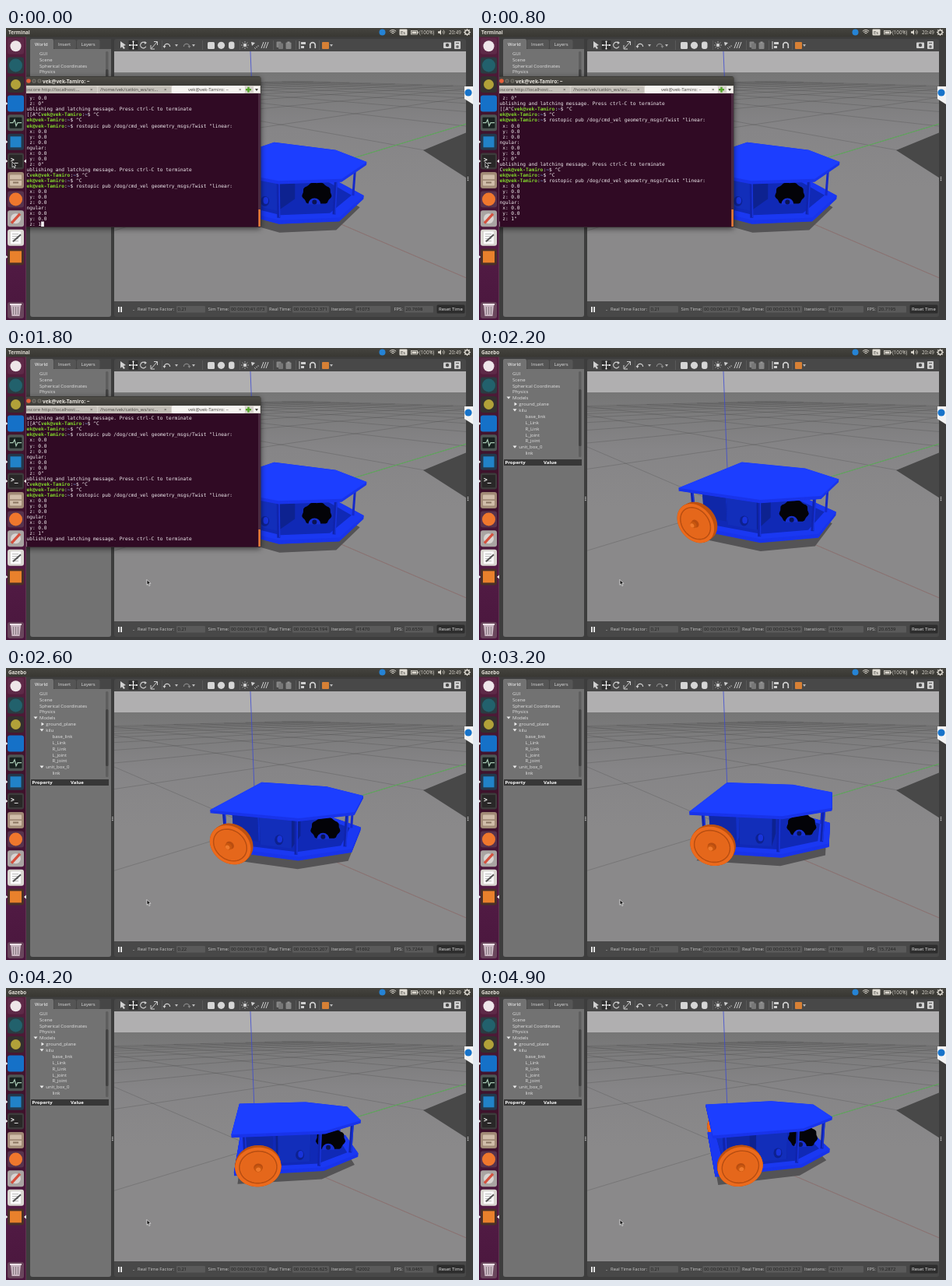
Animation of 600x375 px, one loop 5 s. Source, as an HTML page with a canvas:

```html
<!DOCTYPE html>
<html lang="en">
<head>
<meta charset="utf-8">
<title>Robot simulation</title>
<style>
html, body { margin: 0; width: 100%; height: 100%; overflow: hidden; background: #444; }
canvas { display: block; width: 600px; height: 375px; }
</style>
</head>
<body>
<canvas id="stage" width="600" height="375"></canvas>
<script>
const g = document.getElementById('stage').getContext('2d');
const SANS = '"Open Sans", "Noto Sans", sans-serif';
const MONO = '"DejaVu Sans Mono", "Liberation Mono", monospace';
const CHAR = 3.735, LOOP = 5000;

// ---- helpers ----
function rect(x, y, w, h, c) { g.fillStyle = c; g.fillRect(x, y, w, h); }
function box(x, y, w, h, r, c) { g.fillStyle = c; g.beginPath(); g.roundRect(x, y, w, h, r); g.fill(); }
function disc(x, y, r, c, ry = r) { g.fillStyle = c; g.beginPath(); g.ellipse(x, y, r, ry, 0, 0, 7); g.fill(); }
function trace(pts) { g.beginPath(); pts.forEach(p => g.lineTo(p[0], p[1])); }
function poly(pts, c) { trace(pts); g.closePath(); g.fillStyle = c; g.fill(); }
function line(pts, c, w = 1) { trace(pts); g.strokeStyle = c; g.lineWidth = w; g.stroke(); }
function ring(x, y, r, c, w = 1, a = 0, b = 7) {
  g.beginPath(); g.arc(x, y, r, a, b); g.strokeStyle = c; g.lineWidth = w; g.stroke();
}
function text(s, x, y, c = '#ddd', size = 6, weight = '', family = SANS) {
  g.font = `${weight} ${size}px ${family}`; g.fillStyle = c; g.fillText(s, x, y);
}
function fade(y0, y1, ...stops) {
  const f = g.createLinearGradient(0, y0, 0, y1);
  stops.forEach((c, i) => f.addColorStop(i / (stops.length - 1), c));
  return f;
}
function mix(x, knots) {
  let i = 1;
  while (i < knots.length - 1 && x > knots[i][0]) i++;
  const [a, b] = [knots[i - 1], knots[i]];
  const k = Math.min(1, Math.max(0, (x - a[0]) / (b[0] - a[0])));
  return a[1] + (b[1] - a[1]) * k;
}
const step = (t, list) => list.filter(e => e[0] <= t).pop()[1];

// ---- scene: u is the drop below the camera, 1 at the upper plate ----
const HORIZON = 57, VIEW_W = 452;
function project(X, Z, u) {
  const d = Z + .34 * (u - 1);
  return [366 + 416 * X / d, HORIZON + 416 * u / d];
}
function ground(a, b) {
  return [-.304 + a * .684 + b * .729, 2.81 - a * .729 + b * .684];
}
function groundLine(a0, b0, a1, b1, c, w) {
  let [p, q] = [ground(a0, b0), ground(a1, b1)];
  if (p[1] > q[1]) [p, q] = [q, p];
  const near = .6;
  if (q[1] < near) return;
  if (p[1] < near) {
    const k = (near - p[1]) / (q[1] - p[1]);
    p = [p[0] + (q[0] - p[0]) * k, near];
  }
  line([p, q].map(([X, Z]) => [366 + 416 * X / Z, HORIZON + 416 / Z]), c, w);
}

function world() {
  rect(139, 30, VIEW_W, 28, '#b0afb0');
  rect(139, HORIZON, VIEW_W, 294, fade(57, 351, '#767676', '#868587', '#8a898a', '#8a898a', '#8a898a'));
  const cell = 2.4, end = 24;
  for (let i = -10; i <= 10; i++) {
    const c = 'rgba(60,60,60,.42)';
    groundLine(i * cell, -end, i * cell, end, c, .6);
    groundLine(-end, i * cell, end, i * cell, c, .6);
  }
  groundLine(0, 0, 6, 0, '#9c6f6d', .6);
  groundLine(0, 0, 0, end, '#5cb058', 1);
  line([[314, 30], [321, 205]], '#3c49d2', .8);
  poly([[536, 157], [592, 134], [592, 193]], '#484848');
}

const PLATE = [[-.3, .735], [.64, .735], [1.15, .38], [1.11, -.3], [.62, -.64], [-.32, -.65]];
const POSTS = [[-.2, .6], [.58, .6], [1.04, .32], [1.03, -.24], [.58, -.58], [-.2, -.58]];
const DECK = 1.43;

function robot(deg) {
  const c = Math.cos(deg * Math.PI / 180), s = Math.sin(deg * Math.PI / 180);
  const at = (p, q, u) => project(-.34 + p * c - q * s, 3.85 + p * s + q * c, u);
  const outline = (u, k = 1) => PLATE.map(([p, q]) => at(.35 + (p - .35) * k, q * k, u));
  const slab = (u, thick, top, edge) => {
    for (let d = thick; d > 0; d -= .004) poly(outline(u + d), edge);
    poly(outline(u), top);
  };
  const circle = (q, r) => Array.from({ length: 48 }, (_, i) => {
    const a = i * Math.PI / 24;
    return at(-.07 + r * Math.cos(a), q, 1.345 + r * Math.sin(a));
  });
  const wheel = (from, to) => {
    for (let i = 0; i <= 8; i++) poly(circle(from + (to - from) * i / 8, .228), '#bd5010');
    poly(circle(to, .228), '#ec6a1c');
  };
  const block = (p0, p1, q0, q1, u0, u1, face, side) => {
    for (const p of [p1, p0]) poly([at(p, q0, u0), at(p, q1, u0), at(p, q1, u1), at(p, q0, u1)], side);
    poly([at(p0, q0, u0), at(p1, q0, u0), at(p1, q0, u1), at(p0, q0, u1)], face);
  };

  poly(outline(1.59, .96), '#545355');
  wheel(.68, .74);
  slab(DECK, .045, '#1a38f2', '#1934ea');
  poly(outline(DECK, .84), '#1029b6');
  POSTS.slice(0, 3).forEach(([p, q]) => line([at(p, q, 1.02), at(p, q, DECK)], '#1529c9', 3));
  block(-.2, .1, -.4, .45, 1.08, DECK, '#0f27a8', '#1230c8');
  block(.15, .5, -.47, -.1, 1.08, DECK, '#122eba', '#0d2290');
  const [kx, ky] = at(.38, -.52, 1.32);
  disc(kx, ky, 5.5, '#0d2190', 6.5);
  disc(kx + 1, ky - 1, 3.3, '#1833da', 4.5);

  const [bx, by] = at(.8, -.17, 1.28);
  poly(Array.from({ length: 40 }, (_, i) => {
    const a = i * Math.PI / 20, r = 1 + .045 * Math.sin(9 * a);
    return [bx + 18.5 * r * Math.cos(a), by + Math.min(12, 15 * r * Math.sin(a))];
  }), '#030308');
  g.beginPath(); g.arc(bx - 3, by + 13, 8, Math.PI, 0); g.fillStyle = '#1730d0'; g.fill();
  disc(bx - 3, by + 10, 3, '#0b1454');
  POSTS.slice(3).forEach(([p, q]) => {
    line([at(p, q, 1.02), at(p, q, DECK + .01)], '#1024ac', 4);
    line([at(p + .012, q, 1.02), at(p + .012, q, DECK)], '#1834dc', 1.5);
  });
  slab(1, .034, '#1c3eff', '#1934ea');

  wheel(-.68, -.74);
  const rim = circle(-.74, .185);
  line([...rim, rim[0]], '#b94f12', 1.6);
  poly(circle(-.74, .17), '#e5671b');
  poly(circle(-.74, .045), '#b94d10');
  poly(circle(-.77, .038), '#c9570f');
  poly(circle(-.79, .024), '#f07a2c');
}

// ---- simulator window ----
function tree() {
  rect(26, 11, 574, 364, '#3d3d3d');
  box(31, 20, 104, 351, 3, '#727272');
  rect(61, 14, 74, 13, '#464646');
  box(31, 14, 30, 14, 2, '#727272');
  box(61.5, 15, 28.5, 12, 2, '#555');
  box(91, 15, 29.5, 12, 2, '#555');
  text('World', 37, 23, '#fff'); text('Insert', 67, 23); text('Layers', 96.5, 23);
  const rows = ['GUI', 'Scene', 'Spherical Coordinates', 'Physics', 'Models', ' ground_plane', ' kilu',
    '  base_link', '  L_Link', '  R_Link', '  L_joint', '  R_joint', ' unit_box_0', '  link'];
  rows.forEach((row, i) => {
    const name = row.trim(), depth = row.length - name.length, y = 34.8 + i * 7.88;
    text(name, 43 + depth * 8.3, y, '#e2e2e2');
    if (i === 5) poly([[45.5, y - 4.5], [49, y - 2.2], [45.5, y]], '#eee');
    if (i === 4 || i === 6 || i === 12) {
      const x = depth ? 43.5 : 35.5;
      poly([[x, y - 3.8], [x + 5, y - 3.8], [x + 2.5, y - .7]], '#eee');
    }
  });
  box(128, 30, 3.5, 110, 1.5, '#5e5e5e');
  box(128, 53, 3.5, 73, 1.5, '#424242');
  rect(32, 143, 100, 8, '#373737');
  text('Property', 33.5, 149.2, '#fff', 6, 'bold');
  text('Value', 83, 149.2, '#fff', 6, 'bold');
  for (let i = 0; i < 3; i++) rect(136.2, 191 + i * 2, 1.4, 1.2, '#ccc');
}

function toolbar() {
  box(139, 14, VIEW_W, 357, 3, '#484848');
  const ink = '#d0d0d0', dim = '#868686';
  poly([[147, 17], [154, 22], [151, 23], [153, 26], [151, 27], [149, 24], [147, 26]], ink);
  box(157.5, 16, 12, 12, 1, '#303030');
  line([[159, 22], [168, 22]], '#fff'); line([[163.5, 17.5], [163.5, 26.5]], '#fff');
  [[159, 22], [168, 22], [163.5, 17.5], [163.5, 26.5]].forEach(([x, y]) => disc(x, y, 1.1, '#fff'));
  ring(176.5, 22, 3.8, ink, 1.2, .5, 5.6);
  poly([[178, 17], [181, 19], [178, 21]], ink);
  line([[187, 26], [194, 18]], ink);
  line([[186, 22], [186, 27], [191, 27]], ink); line([[190, 17.5], [194.5, 17.5], [194.5, 22]], ink);
  for (const [x, d, c] of [[207, 1, ink], [232, -1, dim]]) {
    ring(x, 24, 3.6, c, 1.2, Math.PI, 6.3);
    poly([[x - 5.5 * d, 23], [x - 1.5 * d, 23], [x - 3.5 * d, 26]], c);
  }
  [219, 241, 418].forEach(x => poly([[x - 2, 21], [x + 2, 21], [x, 24]], '#bbb'));
  box(259, 18, 9, 9, 1.5, '#d6d6d6'); disc(276.5, 22.3, 4.6, '#d6d6d6'); box(286, 17.5, 7.5, 9.5, 3, '#d6d6d6');
  disc(307, 22, 2.2, ink);
  for (let i = 0; i < 8; i++) {
    const a = i * Math.PI / 4, x = Math.cos(a), y = Math.sin(a);
    line([[307 + 3.2 * x, 22 + 3.2 * y], [307 + 4.8 * x, 22 + 4.8 * y]], ink, .8);
  }
  poly([[315, 18], [320, 19], [316, 23]], ink);
  for (let i = 0; i < 3; i++) {
    line([[319 + i * 2, 25 - i], [321 + i * 2, 27 - i * 2]], ink, .7);
    line([[328 + i * 3, 26], [331 + i * 3, 18]], ink, 1);
  }
  box(347.5, 17.5, 6, 7.5, 1, dim); box(350, 19.5, 6, 7.5, 1, '#777');
  box(359.5, 18.5, 7, 8.5, 1, dim); rect(361.5, 17.5, 3, 2, '#999');
  line([[377, 17], [377, 27]], ink); rect(379, 18, 6, 3, ink); rect(379, 23, 4, 3, ink);
  ring(394, 22, 3.3, ink, 1.7, Math.PI, 6.3);
  rect(390, 22, 1.6, 4, ink); rect(396.5, 22, 1.6, 4, ink);
  box(406, 18, 9, 9, 1, '#d78035');
  [200, 252, 300, 343, 372, 402].forEach(x => rect(x, 16, .7, 12, '#626262'));
  box(562, 18.5, 10, 7.5, 1, ink); disc(567, 22, 2.2, '#4b4b4b');
  box(576, 17, 8, 10, 1, ink); rect(578, 19, 4, 1, '#555'); disc(580, 24, 1.8, '#666');
}

const TICKS = [[0, 0], [800, 4], [1800, 9], [2600, 14], [3200, 16], [4200, 21], [4900, 24]];
const SIM = [[0, 41073], [4, 41270], [9, 41470], [14, 41692], [16, 41780], [21, 42002], [24, 42117]];
const FPS = [[0, '20.7698'], [500, '20.7195'], [1500, '20.6539'], [2400, '15.7244'], [3500, '18.0465'], [4500, '19.2872']];

function statusBar(t) {
  rect(144, 358, 1.8, 7, '#eee'); rect(147.2, 358, 1.8, 7, '#eee');
  rect(163.5, 362, 1, 1, '#aaa');
  const n = Math.floor(mix(t, TICKS) + 1e-6), sim = Math.round(mix(n, SIM));
  const factor = t >= 2400 && t < 3100 ? '0.22' : '0.21';
  const fields = [
    ['Real Time Factor:', 169, 219, 37, factor],
    ['Sim Time:', 259.5, 287.5, 48, '00 00:00:' + (sim / 1000).toFixed(3)],
    ['Real Time:', 338, 368, 47, '00 00:02:' + (52.371 + n * .20255).toFixed(3)],
    ['Iterations:', 418, 449, 45, sim],
    ['FPS:', 498.5, 512, 37, step(t, FPS)]
  ];
  for (const [label, x, fx, w, value] of fields) {
    text(label, x, 363.3, '#c8c8c8', 5.9);
    box(fx, 357, w, 8.5, 1, '#5a5a5a');
    text(value, fx + 1.5, 363.3, '#1c1c1c', 5.9);
  }
  box(553.5, 355.5, 36, 11, 1.5, '#2d2d2d');
  text('Reset Time', 556, 363.3, '#e8e8e8', 6);
}

function rightEdge() {
  for (let i = 0; i < 3; i++) rect(592.8, 191 + i * 2, 1.4, 1.2, '#ccc');
  poly([[589, 75], [600, 75], [600, 98], [589, 91]], '#f3f3f3');
  disc(594, 83, 4.6, '#1773ca');
}

// ---- terminal ----
const USER = 'vek@vek-Tamiro';
const PUB = '$rostopic pub /dog/cmd_vel geometry_msgs/Twist "linear:';
const LATCH = 'publishing and latching message. Press ctrl-C to terminate';
const TWIST = ['  x: 0.0', '  y: 0.0', '  z: 0.0', 'angular:', '  x: 0.0', '  y: 0.0'];
const HISTORY = [...TWIST.slice(5), '  z: 0"', LATCH, '^[[A^C$^C', '$^C', PUB,
  ...TWIST, '  z: 0"', LATCH, '^C$^C', '$^C', PUB, ...TWIST];

function row(s, y) {
  const put = (str, col, c = '#f2eef1', w = '') => text(str, 22.7 + col * CHAR, y, c, 6.2, w, MONO);
  const i = s.indexOf('$');
  if (i < 0) return put(s, 0);
  const k = i + USER.length;
  put(s.slice(0, i), 0);
  put(USER, i, '#82d72c', 'bold');
  put(':', k); put('~', k + 1, '#7195cf', 'bold'); put('$', k + 2);
  put(s.slice(i + 1), k + 4);
}

function terminal(t) {
  g.save();
  g.shadowColor = 'rgba(0,0,0,.55)'; g.shadowBlur = 7; g.shadowOffsetY = 2;
  box(20, 62, 307.5, 194, 3, '#3b3a36');
  g.restore();
  rect(20, 63, 307, 11, fade(62, 74, '#504e48', '#3c3b37'));
  disc(29, 68, 2.8, '#e6603b');
  [36, 43].forEach(x => { disc(x, 68, 2.6, '#77756d'); disc(x, 68, 1.5, '#55534d'); });
  text(USER + ': ~', 47, 70.5, '#e9e6df', 6.5, 'bold');
  rect(20, 74, 307, 10, '#d6d2cb');
  box(20, 75, 97, 9, 2, '#c4c0b9'); box(118, 75, 94, 9, 2, '#c4c0b9'); box(213, 74, 94, 10, 2, '#f5f3f0');
  const ink = '#45433f';
  text('roscore http://localhost:…', 23, 81.3, ink, 6);
  text('/home/vek/catkin_ws/src…', 121, 81.3, ink, 6);
  text(USER + ': ~', 234, 81.3, ink, 6);
  [110, 205, 301].forEach(x => text('×', x - 2, 81.3, ink, 6));
  rect(308, 78, 7, 2.4, '#55a52c'); rect(310.3, 75.7, 2.4, 7, '#55a52c');
  box(318, 75, 8, 8, 1, '#f5f3f0'); poly([[320, 78], [324, 78], [322, 81]], ink);
  rect(20, 84, 307, 171.5, '#300a24');
  rect(324, 84, 3, 171, '#4a2a40');
  rect(324.4, 233, 2.4, 22, '#ee7d35');

  const rows = [...HISTORY, t < 300 ? '  z: 1' : '  z: 1"'];
  if (t >= 1300) rows.push(LATCH);
  if (t >= 500) rows.push('');
  const last = rows.slice(-24);
  last.forEach((s, i) => row(s, 92.3 + i * 7.04));
  rect(22.7 + last[23].length * CHAR, 248.5, CHAR, 6.6, '#f2eef1');
}

// ---- desktop ----
function launcher(front) {
  rect(0, 11, 26, 364, fade(11, 375, '#57203f', '#43152f', '#3b1029', '#521b45', '#4a173d'));
  rect(25.3, 11, .7, 364, '#6b4159');
  const tiles = ['#5e2a48', '#2b3c42', '#33302f', '#1571c8', '#4d5654', '#24384c', '#3d3b3b',
    '#a18a76', '#57334d', '#a9a4a2', '#d9d7d1', '#4a3027'];
  const y = i => 23.3 + i * 24.6;
  tiles.forEach((c, i) => box(2, y(i) - 10.5, 21, 21, 3, c));
  disc(12.5, y(0), 7, '#eee6e9');
  disc(12.5, y(1), 8.5, '#22616c');
  disc(12.5, y(2), 6.5, '#b1a139');
  box(4.5, y(4) - 7, 16, 14, 1, '#18211f');
  line([[5, y(4)], [9, y(4)], [11, y(4) - 4], [13, y(4) + 4], [15, y(4)], [20, y(4)]], '#a8c9b4', 1.2);
  box(5.5, y(5) - 7, 14, 14, 0, '#2182c8');
  box(4, y(6) - 8, 17, 16, 1, '#292727');
  text('>_', 6, y(6) + 1.5, '#fff', 8, 'bold', MONO);
  box(5, y(7) - 7, 15, 14, 1, '#d0bda9');
  rect(5, y(7) - 1, 15, 1.2, '#8c7662'); rect(9, y(7) + 2, 7, 2, '#8c7662');
  disc(12.5, y(8), 8.5, '#ef772d');
  disc(12.5, y(9), 6.5, '#d8d4d2');
  line([[7, y(9) + 6], [18, y(9) - 6]], '#d5503d', 3.2);
  box(6, y(10) - 8, 13, 16, 1, '#fafafa');
  for (let i = 0; i < 4; i++) rect(8, y(10) - 5 + i * 3, 8, .8, '#aaa');
  line([[9, y(10) + 5], [19, y(10) - 4]], '#555', 2);
  box(5, y(11) - 7.5, 15, 15, 0, '#e9812c');
  [3, 5, 6, 11].forEach(i => poly([[0, y(i) - 2], [2.2, y(i)], [0, y(i) + 2]], '#eee'));
  poly([[26, y(front) - 2.5], [23, y(front)], [26, y(front) + 2.5]], '#eee');
  box(2, 352, 21, 21, 3, '#69465c');
  poly([[6, 356], [19, 356], [17.5, 370], [7.5, 370]], '#c8b4c0');
  rect(5, 354, 15, 2, '#ece0e6');
  [9, 12, 15].forEach(x => rect(x, 358, 1, 10, '#8a7d85'));
}

function topBar(title) {
  rect(0, 0, 600, 11.5, fade(0, 11, '#45443f', '#393833'));
  text(title, 3, 7.8, '#e4e0d8', 6.3, 'bold');
  const ink = '#dfdbd2';
  disc(483.5, 5.5, 4, '#2583d5');
  [2, 4, 6].forEach(r => ring(497, 8.5, r, ink, 1, 3.95, 5.48));
  box(505.5, 1.5, 10, 8, 1, ink);
  text('Es', 507, 7.8, '#3c3b37', 6);
  g.strokeStyle = ink; g.lineWidth = .8; g.strokeRect(520.5, 3.5, 8, 4.5);
  rect(521.5, 4.5, 6, 2.5, ink); rect(529, 4.7, 1, 2, ink);
  text('(100%)', 531, 7.9, ink, 6.2);
  poly([[555, 4.3], [557, 4.3], [559, 2], [559, 9], [557, 6.8], [555, 6.8]], ink);
  ring(559.5, 5.5, 2, ink, .7, -.9, .9); ring(559.5, 5.5, 3.8, ink, .7, -.9, .9);
  text('20:49', 569, 7.9, ink, 6.2);
  ring(592.5, 5.5, 2.7, ink, 1.4);
  for (let i = 0; i < 8; i++) disc(592.5 + 3.8 * Math.cos(i * .785), 5.5 + 3.8 * Math.sin(i * .785), .7, ink);
}

function pointer(t) {
  const k = Math.min(1, Math.max(0, (t - 1000) / 600)), e = k * k * (3 - 2 * k);
  const x = 8 + 173 * e, y = 172 + 125.5 * e;
  const shape = [[0, 0], [0, 6.8], [1.6, 5.4], [2.8, 8], [4, 7.4], [2.8, 5], [4.8, 4.8]].map(p => [x + p[0], y + p[1]]);
  poly(shape, '#111');
  line([...shape, shape[0]], '#fff', .7);
}

const TURN = [[0, -29.5], [1900, -29.5], [2600, -16.5], [3200, -8.6], [4200, 6.6], [4900, 13.8]];

function draw(now) {
  const t = Math.floor(now % LOOP / 100) * 100, open = t < 2000;
  tree();
  toolbar();
  g.save();
  g.beginPath(); g.rect(139, 30, VIEW_W, 321); g.clip();
  world();
  robot(mix(t, TURN));
  g.restore();
  statusBar(t);
  rightEdge();
  if (open) terminal(t);
  launcher(open ? 6 : 11);
  topBar(open ? 'Terminal' : 'Gazebo');
  pointer(t);
}

const start = performance.now();
function tick() {
  draw(performance.now() - start);
  requestAnimationFrame(tick);
}
tick();
</script>
</body>
</html>
```
